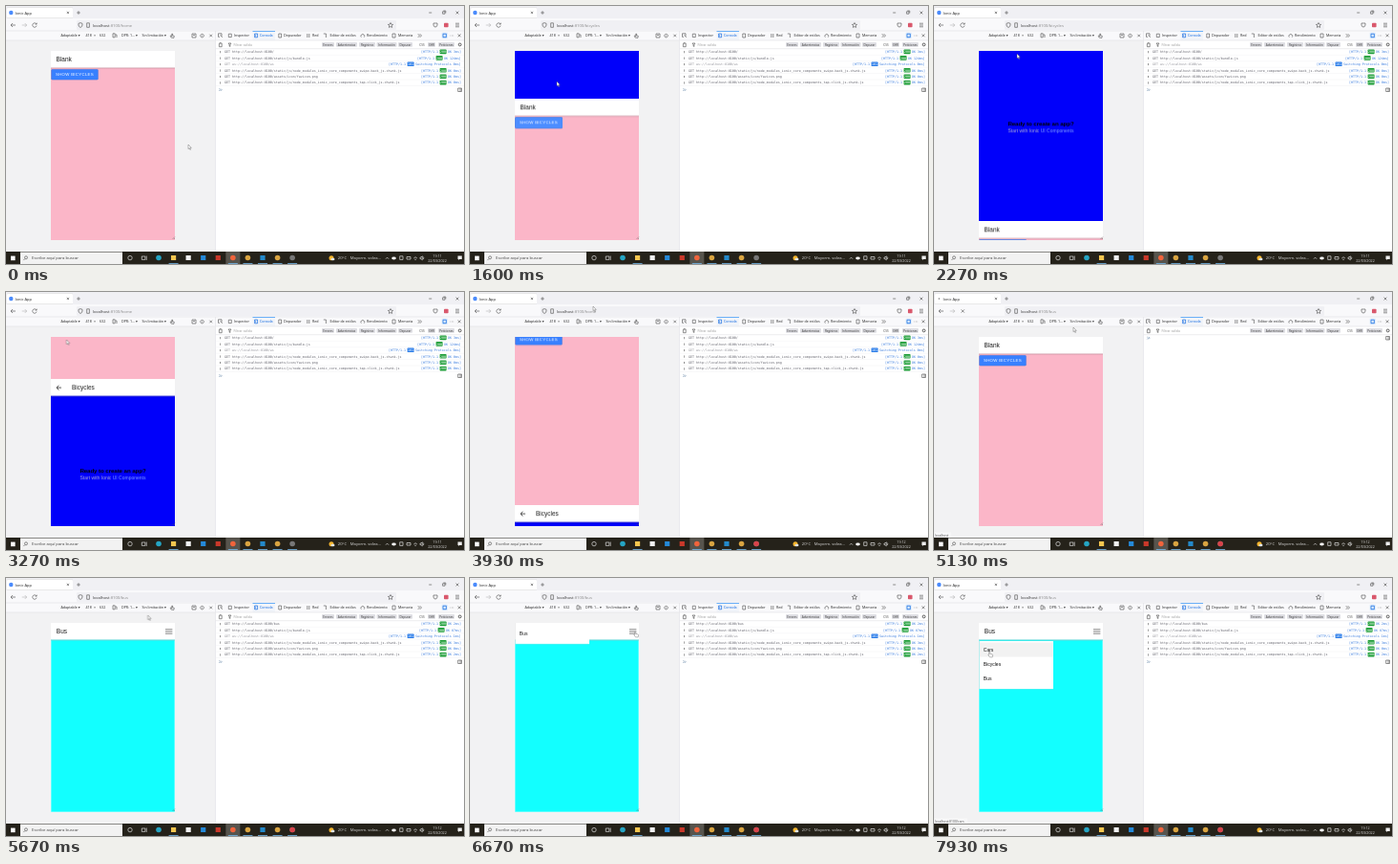
An HTML page that plays this animation: 480x270 px, repeating every 8 s.

```html
<!DOCTYPE html>
<html lang="es">
<head>
<meta charset="utf-8">
<title>Page transitions</title>
<style>
html, body { margin: 0; width: 100%; height: 100%; overflow: hidden; background: #f9f9fb; }
svg { display: block; width: 100vw; height: 100vh; }
text { font: 3.65px "Open Sans", sans-serif; fill: #222; white-space: pre; }
.mono { font: 3.32px "DejaVu Sans Mono", monospace; fill: #5c5c66; }
.url { font-size: 4.2px; fill: #888; }
.host { fill: #333; }
.tab { font-size: 4px; }
.filter { font-size: 3.1px; fill: #333; }
.title { font: 6.5px "Liberation Sans", Arial, sans-serif; fill: #1c1c1c; }
.item { font: 5px "Liberation Sans", Arial, sans-serif; fill: #111; }
.label { font: 4.4px "Liberation Sans", Arial, sans-serif; letter-spacing: .26px; fill: #fff; }
.task { font-size: 4.3px; fill: #444; }
.tray { font-size: 3.7px; fill: #ddd; }
.line { fill: none; stroke: #555; stroke-width: .65; }
.light { fill: none; stroke: #ddd; stroke-width: .7; }
.soft { filter: drop-shadow(0 .4px .6px #0004); }

#home, #bikes, #menu { animation: 8s linear infinite; }
#home { animation-name: home; }
#bikes { animation-name: bikes; }
#menu { animation-name: menu; }
#cursor { animation: cursor 8s ease-in-out infinite; }
@keyframes home {
  0%, 16.725% { transform: translateY(0); }
  29.675%, 38.12% { transform: translateY(198px); }
  38.125% { transform: translateY(-198px); }
  50.5%, 100% { transform: translateY(0); }
}
@keyframes bikes {
  0%, 16.725% { transform: translateY(-198px); }
  29.675%, 38.125% { transform: translateY(0); }
  50.5%, 100% { transform: translateY(198px); }
}
@keyframes menu {
  0%, 82.44% { transform: translateY(-51px); }
  95%, 100% { transform: translateY(0); }
}
@keyframes cursor {
  0%, .8% { transform: translate(191px, 145px); }
  10.9% { transform: translate(105px, 86px); }
  13.5%, 16.8% { transform: translate(82px, 72px); }
  20% { transform: translate(91px, 79px); }
  28.4% { transform: translate(87px, 50px); }
  32.5% { transform: translate(62px, 57px); }
  34.1%, 38.2% { transform: translate(54px, 55px); }
  49.1%, 58% { transform: translate(129px, 15px); }
  64.1%, 69% { transform: translate(146px, 37px); }
  77.5%, 84% { transform: translate(172px, 56px); }
  93.4%, 98% { transform: translate(57px, 76px); }
  99.1%, 100% { transform: translate(57px, 77px); }
}
</style>
</head>
<body>
<svg viewBox="0 0 480 270" preserveAspectRatio="none">
  <defs>
    <clipPath id="screen"><rect x="47" y="47" width="130" height="198"/></clipPath>
    <linearGradient id="shade" x2="0" y2="1">
      <stop stop-color="#000" stop-opacity=".22"/><stop offset="1" stop-color="#000" stop-opacity="0"/>
    </linearGradient>
    <g id="bar">
      <rect x="47" y="47" width="130" height="17.6" fill="#fff"/>
      <rect x="47" y="64.6" width="130" height="1.4" fill="url(#shade)"/>
    </g>
  </defs>

  <!-- browser chrome -->
  <rect width="480" height="14" fill="#f0f0f4"/>
  <rect x="1" y="1.5" width="69" height="11" rx="1.3" fill="#fff" class="soft"/>
  <g data-on="0-4850 5600-8000"><circle cx="5.3" cy="7" r="2.2" fill="#4a8bfc"/></g>
  <g data-on="4850-5600"><circle cx="5.3" cy="7" r=".8" fill="#777"/></g>
  <text class="tab" x="9.5" y="8.5">Ionic App</text>
  <path class="line" d="M63.8 5.8l2.2 2.2m0-2.2l-2.2 2.2M74.2 7h3.6m-1.8-1.8v3.6M443.2 7h3M457.6 5.8h2.4v2.4h-2.4zM458.4 5h2.4v2.4M471.6 5.6l2.8 2.8m0-2.8l-2.8 2.8"/>
  <rect y="13" width="480" height="13" fill="#f9f9fb"/>
  <rect x="74" y="15" width="335" height="10" rx="1.3" fill="#f0f0f4"/>
  <path class="line" d="M10 20h-5m2-2l-2 2 2 2M76 18.3l2-.7 2 .7v1.6q0 1.7-2 2.6-2-.9-2-2.6zM84.7 17.8h2.7v4.5h-2.7zM403 17.5l.8 1.7 1.8.2-1.3 1.2.3 1.8-1.6-.9-1.6.9.3-1.8-1.3-1.2 1.8-.2zM448 18h4v2q-.4 2-2 2t-2-2zM471 18.2h4M471 20h4M471 21.8h4"/>
  <path class="line" stroke-opacity=".4" d="M16.7 20h5m-2-2l2 2-2 2"/>
  <g data-on="0-4850 5600-8000"><path class="line" d="M31.8 18.8a2.2 2.2 0 1 0 .3 1.8M32.2 17.6v1.5h-1.5"/></g>
  <g data-on="4850-5600"><path class="line" d="M28.6 18.4l3.2 3.2m0-3.2l-3.2 3.2"/></g>
  <rect x="459" y="17.8" width="4.6" height="4.4" rx=".8" fill="#d9586c"/>
  <rect data-on="4150-4400" x="90.5" y="17" width="42" height="6" fill="#7ab7f5"/>
  <g id="urls"></g>

  <!-- responsive view -->
  <rect y="26" width="219.5" height="231" fill="#f2f2f3"/>
  <rect y="26" width="219.5" height="10" fill="#f9f9fb"/>
  <g id="viewbar"></g>
  <path class="line" d="M112 28.8h2.2v4H112zM114.8 30h1.2v3M173 33l-.8-1.6.8-.6.8 1v-2.7h.8v1.8l1.7.5-.4 2zM195 29h4v4h-4zM196 30.5h2M205.5 29.3a1.8 1.8 0 1 0 .1 0M205.5 30.6v1M213.4 29.7l2.6 2.6m0-2.6l-2.6 2.6"/>
  <rect x="47" y="47" width="130" height="198" fill="#fff" class="soft"/>
  <g clip-path="url(#screen)">
    <g id="home">
      <rect x="47" y="47" width="130" height="198" fill="#fbb6c8"/>
      <use href="#bar"/>
      <text class="title" x="52.6" y="58.4">Blank</text>
      <rect class="soft" x="47.4" y="66.2" width="49.2" height="11" rx="1.2" fill="#3880ff"/>
      <rect data-on="980-2400" class="soft" x="47.2" y="66.3" width="49.8" height="11.5" rx="1.2" fill="#4c8dff"/>
      <text class="label" x="52" y="73.2">SHOW BICYCLES</text>
    </g>
    <g id="bikes">
      <rect x="47" y="47" width="130" height="198" fill="#0000fa"/>
      <use href="#bar"/>
      <path class="line" d="M58 56h-5m2.3-2.4L53 56l2.3 2.4" style="stroke:#222;stroke-width:.8"/>
      <text class="title" x="69" y="58.4">Bicycles</text>
      <text class="item" x="112" y="145" text-anchor="middle" style="font-size:6.2px;font-weight:700;letter-spacing:-.1px;fill:#000">Ready to create an app?</text>
      <text class="item" x="112" y="152.2" text-anchor="middle" style="fill:#a9a9d8">Start with Ionic <tspan fill="#7fa0ff">UI Components</tspan></text>
    </g>
    <g data-on="5400-8000">
      <rect x="47" y="47" width="130" height="198" fill="#12ffff"/>
      <rect x="47.2" y="65" width="129.6" height="179.8" fill="none" stroke="#9ff" stroke-width=".7"/>
      <use href="#bar"/>
      <text class="title" x="52.8" y="58.4">Bus</text>
      <path class="line" d="M167 53.8h7.4M167 56h7.4M167 58.2h7.4" style="stroke:#666;stroke-width:.8"/>
      <g data-on="6595-8000"><g id="menu">
        <rect x="47.4" y="66" width="77.6" height="50.2" fill="#fff" class="soft"/>
        <rect data-on="7530-8000" x="48" y="67.5" width="76.5" height="15" fill="#f2f2f2"/>
        <text class="item" x="51.8" y="77.4">Cars</text>
        <text class="item" x="51.8" y="92.4">Bicycles</text>
        <text class="item" x="51.8" y="107.4">Bus</text>
      </g></g>
    </g>
  </g>
  <path class="line" d="M174.5 244l2.5-2.5M176 244l1-1" stroke-opacity=".6"/>
  <g id="status"></g>

  <!-- developer tools -->
  <rect x="219.5" y="26" width="260.5" height="231" fill="#fff"/>
  <rect x="219.5" y="26" width="260.5" height="10" fill="#f9f9fb"/>
  <rect x="258.5" y="26" width="23.5" height="10" fill="#f1f4f9"/>
  <rect x="258.5" y="26" width="23.5" height=".8" fill="#0a84ff"/>
  <path d="M219.5 26V257M219.5 36H480M219.5 44.7H480M0 26H480M0 36H219" fill="none" stroke="#e0e0e5" stroke-width=".6"/>
  <path class="line" d="M226 31.5v-2.7h-3.5v3.5h1.5M224.5 30.5l2.4 2.2M233.3 29.2h3v3.4h-3zM285.8 29h2.8v4h-2.8zM315.8 33v-4m2 4v-4M332.8 29h2.6v4M372.3 32.6a1.9 1.9 0 1 1 3 0M405 29h3v4h-3zM431.8 29.2l1.7 1.8-1.7 1.8m2-3.6l1.7 1.8-1.7 1.8M465.6 31h.5m1 0h.5m1 0h.5M473.7 29.4l2.9 2.9m0-2.9l-2.9 2.9"/>
  <rect x="456.7" y="27.7" width="6" height="6.3" rx=".8" fill="#d5e7fb"/>
  <path class="line" d="M458 29.2h3.4v3.5H458z" style="stroke:#0060df"/>
  <path class="line" d="M260.6 29h3v3.8h-3zM261.3 30.2l.8.7-.8.7" style="stroke:#0060df"/>
  <path class="line" d="M223 39.2h3.6M223.4 39.5v3.2h2.8v-3.2M224.1 38.4h1.4M233 39h3l-1.1 1.5v2l-.8-.5v-1.5z"/>
  <circle class="line" cx="475.7" cy="40.4" r="1.4" style="stroke-width:1"/>
  <g id="tools"></g>
  <g id="before" data-on="0-4900"></g>
  <g id="after" data-on="5350-8000"></g>
  <g id="prompts"></g>

  <!-- taskbar -->
  <rect y="257" width="480" height="13" fill="#25221a"/>
  <rect x="5" y="261.6" width="4.6" height="4.6" fill="#fff"/>
  <rect x="15" y="257.5" width="107" height="12.5" fill="#f2f2f2"/>
  <circle class="line" cx="21" cy="263.3" r="1.5"/><path class="line" d="M19.9 264.5l-1.5 1.5"/>
  <text class="task" x="27" y="265.4">Escribe aquí para buscar</text>
  <circle class="light" cx="130" cy="263.6" r="2.2"/>
  <path class="light" d="M142.3 262h3.6v3.4h-3.6zM147.2 261.5v4.5"/>
  <g id="apps"></g>
  <circle cx="341" cy="263.7" r="2.5" fill="#f6b52e"/><ellipse cx="342.5" cy="265" rx="2" ry="1.2" fill="#dfe6ee"/>
  <text class="tray" x="347.8" y="265.2" style="font-size:4.2px">20°C</text>
  <text class="tray" x="360.8" y="265.2" style="font-size:4.2px">Mayorm. solea...</text>
  <path class="light" d="M398 264.7l1.5-1.6 1.5 1.6M412.7 261.8h3.3v3.6h-3.3zM420 262.5h4v2.5h-4zM427.3 264q1.8-2.5 3.6 0M428.3 265.3h1.6M434 263v1.6h1l1.3 1.2v-4l-1.3 1.2zM437.3 262.5q1 1.3 0 2.6"/>
  <path d="M473.5 261.5h4.3v3.6h-2.5l-1 1v-1h-.8z" fill="#eee"/>
  <ellipse cx="406.5" cy="264" rx="2.3" ry="1.4" fill="#fff"/>
  <text data-on="0-3500" class="tray" x="452" y="262.7" text-anchor="middle">19:11</text>
  <text data-on="3500-8000" class="tray" x="452" y="262.7" text-anchor="middle">19:12</text>
  <text class="tray" x="452" y="268.4" text-anchor="middle">22/03/2022</text>

  <g id="cursor" stroke="#555" stroke-width=".4" fill="#fff">
    <path data-on="0-980 1480-2680 3250-6400 6900-7480" d="M0 0V4.7L1.1 3.7 1.9 5.5 2.6 5.2 1.8 3.4H3.3Z"/>
    <path data-on="980-1480 2680-3250 6400-6900 7480-8000" d="M.6.4q.6-.7 1.1 0V2.4l2.4.6q.7.3.5 1.1L4.2 5.9H1.6L-.2 3.6q0-.8.8-.3Z"/>
  </g>
</svg>
<script>
const LOOP = 8000;
const add = (id, markup) => document.getElementById(id).insertAdjacentHTML('beforeend', markup);
const label = (x, y, words, cls = '', more = '') => `<text x="${x}" y="${y}" class="${cls}" ${more}>${words}</text>`;

// Address bar, including the typed address
const addresses = [
  ['home', '0-1338 3050-4400'], ['bicycles', '1338-3050'], ['', '4400-4550'],
  ['b', '4550-4650'], ['bu', '4650-4750'], ['bus', '4750-8000']
];
for (const [path, on] of addresses)
  add('urls', label(91, 21.7, `<tspan class="host">localhost</tspan>:8100/${path}`, 'url', `data-on="${on}"`));

const hints = [['localhost:8100/bicycles', '1000-1400', 42], ['localhost', '4900-5600', 18], ['localhost:8100/cars', '7870-8000', 35]];
for (const [words, on, width] of hints)
  add('status', `<g data-on="${on}"><rect y="251.5" width="${width}" height="5.5" fill="#f7f7f8"/>${label(1, 255.6, words, '', 'style="font-size:3.4px;fill:#555"')}</g>`);

const viewLabels = [[57.5, 'Adaptable ▾'], [83.5, '418'], [92, '×'], [98, '632'], [121, 'DPR: 1... ▾'], [142.5, 'Sin limitación ▾']];
for (const [x, words] of viewLabels) add('viewbar', label(x, 32.3, words));

const panels = [[239, 'Inspector'], [266, 'Consola'], [291, 'Depurador'], [321, 'Red'], [339.5, 'Editor de estilos'], [378, 'Rendimiento'], [411, 'Memoria']];
for (const [x, words] of panels)
  add('tools', label(x, 32.3, words, '', words === 'Consola' ? 'style="fill:#0060df"' : ''));
add('tools', label(238.5, 41.8, 'Filtrar salida', '', 'style="fill:#999;font-size:3.4px"'));

const filters = [[331, 13, 'Errores'], [346, 22, 'Advertencias'], [370, 17, 'Registros'], [388.5, 21, 'Información'], [411, 15, 'Depurar'], [432, 8, 'CSS'], [442, 8, 'XHR'], [453, 17, 'Peticiones']];
for (const [x, width, words] of filters) {
  const fill = words === 'CSS' ? 'none' : '#dedee3';
  add('tools', `<rect x="${x}" y="38" width="${width}" height="4.8" rx=".8" fill="${fill}"/>` +
    label(x + width / 2, 41.5, words, 'filter', 'text-anchor="middle"'));
}

// Network log
const chunk = name => `static/js/node_modules_ionic_core_components_${name}_js.chunk.js`;
function fillLog(id, page, times, late) {
  const files = [page, 'static/js/bundle.js', 'ws', chunk('swipe-back'), 'assets/icon/favicon.png', chunk('tap-click')];
  files.forEach((file, i) => {
    const socket = i === 2, y = 49.2 + i * 6.45;
    const reply = socket ? '101 Switching Protocols' : '200 OK';
    const status = `[HTTP/1.1 ${reply} ${times[i]}ms]`;
    const left = 477 - status.length * 2;
    const colour = socket ? '#2b7de9' : '#1e9e38';
    add(id, `<g ${i > 2 && late ? `data-on="${late}-8000"` : ''}>
      <path d="M219.5 ${y + 2.1}H480" stroke="#ececf0" stroke-width=".4"/>
      <path class="line" d="M224 ${y - 2}l1.1 1-1.1 1"/>
      ${label(229, y, `GET ${socket ? 'ws' : 'http'}://localhost:8100/${file}`, 'mono', socket ? 'style="fill:#909098"' : '')}
      ${label(left, y, status, 'mono', 'style="fill:#3578dc"')}
      <rect x="${left + 19.6}" y="${y - 3.6}" width="7" height="4.6" rx=".7" fill="${colour}"/>
      ${label(left + 20, y, reply.slice(0, 3), 'mono', 'style="fill:#fff"')}</g>`);
  });
}
fillLog('before', '', [3, 124, 0, 0, 0, 0]);
fillLog('after', 'bus', [2, 87, 1, 3, 0, 2], 5670);

for (const [y, on] of [[87.7, '0-4900 5350-8000'], [48.2, '4900-5350']])
  add('prompts', `<g data-on="${on}"><path class="line" d="M223.3 ${y - 1.2}l1.2 1.2-1.2 1.2m1.6-2.4l1.2 1.2-1.2 1.2" style="stroke:#68a"/>
    <path class="line" d="M473.7 ${y - 1.7}h3.8v3.5h-3.8zm2.4 0v3.5"/></g>`);

// Taskbar programs as plain marks
const apps = [
  ['circle', '#25a5c4'], ['square', '#f5c64f'], ['square', '#f2f2f2'], ['square', '#2589d8'], ['square', '#c9382a'],
  ['circle', '#f0643c', 'active'], ['circle', '#d9a441'], ['square', '#2489ca'], ['circle', '#d9a441'], ['circle', '#777']
];
apps.forEach(([shape, colour, active], i) => {
  const x = 160 + i * 15.57;
  if (active) add('apps', `<rect x="${x - 7.5}" y="257" width="15" height="13" fill="#57544d"/>`);
  add('apps', shape === 'square'
    ? `<rect x="${x - 2.6}" y="261" width="5.2" height="5" fill="${colour}"/>`
    : `<circle cx="${x}" cy="263.5" r="2.8" fill="${colour}"/>`);
  if (i === 1 || i > 4) add('apps', `<rect x="${x - 5}" y="269.2" width="10" height=".8" fill="#76b9ed"/>`);
});
// The recorder's mark turns red while the second half plays
add('apps', '<circle data-on="3500-8000" cx="300.1" cy="263.5" r="2.8" fill="#d8434a"/>');

// Turn each data-on list of "from-to" times into stepped keyframes
let rules = '';
document.querySelectorAll('[data-on]').forEach((el, i) => {
  const frames = new Map([[0, 0]]);
  for (const span of el.dataset.on.split(' ')) {
    const [from, to] = span.split('-').map(Number);
    frames.set(from, 1);
    if (to < LOOP) frames.set(to, 0);
  }
  frames.set(LOOP, [...frames.values()].pop());
  const steps = [...frames].map(([t, v]) => `${t / LOOP * 100}%{opacity:${v}}`).join('');
  rules += `@keyframes on${i}{${steps}}`;
  el.style.animation = `on${i} ${LOOP}ms step-end infinite`;
});
document.head.insertAdjacentHTML('beforeend', `<style>${rules}</style>`);
</script>
</body>
</html>
```
